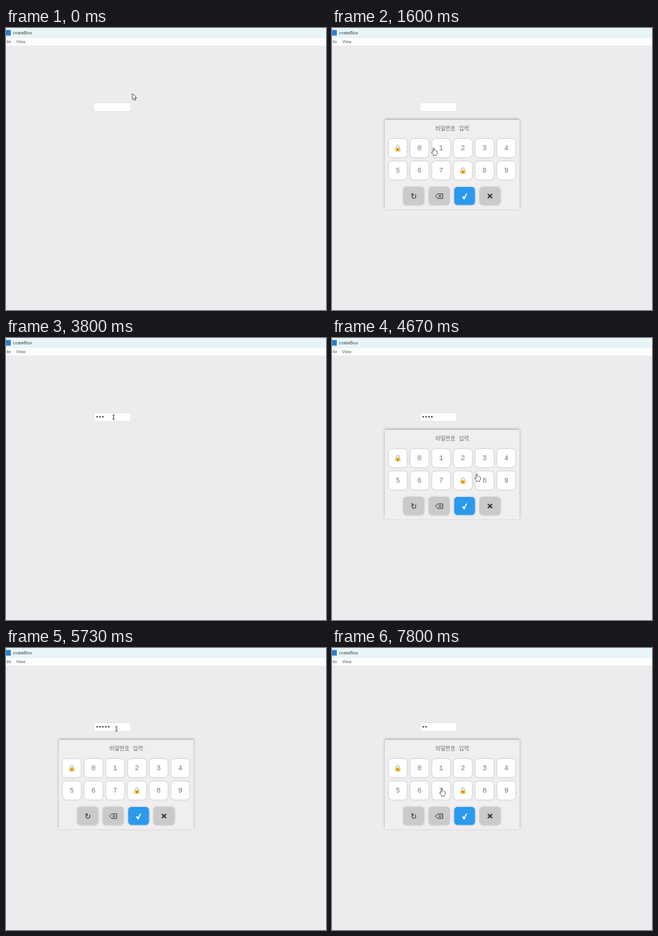
An HTML page that plays this animation: 400x353 px, repeating every 8000 ms.

```html
<!DOCTYPE html>
<html lang="ko">
<head>
<meta charset="utf-8">
<title>Keypad</title>
<style>
  html, body { margin: 0; width: 100%; height: 100%; overflow: hidden; background: #edebee; }
  svg { display: block; width: 400px; height: 353px; }
  .ui { font: 5.8px "Open Sans", "Noto Sans", sans-serif; fill: #333; }
  .menu { font-size: 5.4px; fill: #555b66; }
  .title { font: 6.8px "Noto Sans CJK KR", "Noto Sans CJK", "Noto Sans CJK JP", sans-serif; word-spacing: 2.6px; fill: #6c6c6c; }
  .digit { font: 8.8px "Liberation Mono", monospace; fill: #777; }
  .icon { font: 9.5px "DejaVu Sans", sans-serif; fill: #222; }
  .title, .digit, .icon { text-anchor: middle; }
  .panel { fill: #f0eef1; filter: drop-shadow(0 -.2px 1.4px rgba(0, 0, 0, .3)); }
  .key { filter: drop-shadow(0 .8px 1.1px rgba(0, 0, 0, .24)); }
  .line { fill: none; stroke: #222; }
  .pointer { fill: #fff; stroke: #444; stroke-width: .75; stroke-linejoin: round; }
</style>
</head>
<body>
<svg viewBox="0 0 400 353">
  <defs>
    <g id="lock" transform="scale(.88)">
      <path d="M-2 0V-1.8a2 2.2 0 0 1 4 0V0" fill="none" stroke="#a9a49b" stroke-width="1"/>
      <rect x="-3.6" y="-.6" width="7.2" height="5.4" rx=".9" fill="#f3c04a"/>
      <path d="M0 1.2V3.1" stroke="#6b5020" stroke-width="1.1" stroke-linecap="round"/>
    </g>
  </defs>

  <rect width="400" height="353" fill="#edebee"/>
  <rect width="400" height="13" fill="#e7f4f8"/>
  <rect y="12.5" width="400" height="9.5" fill="#fdfdfd"/>
  <rect x="-1" y="2.5" width="7" height="7" fill="#2c7fcb"/>
  <text class="ui" x="8.8" y="7.9">crateBox</text>
  <text class="ui menu" x="-2.2" y="19.2">File</text>
  <text class="ui menu" x="12.8" y="19.2">View</text>

  <rect x="110" y="93.5" width="46" height="10.8" fill="#fff" stroke="#e3e1e4" stroke-width=".8"/>
  <g id="dots" fill="#111"></g>

  <g id="pad">
    <rect class="panel" x="66" y="115" width="168.5" height="112"/>
    <text class="title" x="150.2" y="127.7">비밀번호 입력</text>
    <g id="keys"></g>
    <text class="icon" x="102.2" y="213.6">↻</text>
    <path class="line" stroke-width=".75" d="M129.3 210.5l2.8-2.8h6.3v5.6h-6.3zM133.4 209l3 3M136.4 209l-3 3"/>
    <path d="M162.4 211.2l1.6-.7 1.1 1.6q1.2-3.2 3-5l1 .4q-2.2 3.2-3.2 6.9h-1.5q-.8-2-2-3.2z" fill="#fff"/>
    <path class="line" stroke-width="1.4" d="M194.8 207.7l5.4 5.4M200.2 207.7l-5.4 5.4"/>
  </g>

  <g id="cursor">
    <path id="arrow" class="pointer" d="M0 0V7.6L1.8 6 3 8.7 4.3 8.1 3.1 5.5H5.4Z"/>
    <path id="beam" class="line" stroke-width=".75" d="M-1.5-2.8Q-.2-2.8 0-2.2Q.2-2.8 1.5-2.8M0-2.2V2.4M-1.5 3Q-.2 3 0 2.4Q.2 3 1.5 3"/>
    <path id="hand" class="pointer" transform="scale(.9)" d="M-.8.8Q-.8 0 0 0T.8.8V3.4Q1.6 2.9 2.3 3.7Q3.2 3.3 3.7 4.1Q5 3.9 5 5.2V7.2Q5 8.6 4.2 9.3V10.4H-.4V9.5L-2.5 6.6Q-3.1 5.5-2.2 5.2Q-1.6 5.1-.8 6Z"/>
  </g>
</svg>
<script>
const LOOP = 8000, FPS = 15, TRAVEL = 330, REST = 270;
const $ = id => document.getElementById(id);

// Clicks: [ms, x, y]; what each one does follows from where it lands
const clicks = [
  [470, 136, 98], [1670, 127, 150], [1930, 127, 150], [2470, 128, 174], [3470, 164, 206],
  [4070, 134.5, 99], [4400, 169, 146], [4870, 181, 170], [5200, 164, 207],
  [5670, 138, 101], [6730, 108, 206], [7470, 129, 151], [7730, 137, 176]
];
const home = [0, 158, 82];

const actions = {
  open: s => s.open = true,
  close: s => s.open = false,
  type: s => s.count++,
  erase: s => s.count--,
  clear: s => s.count = 0
};
const field = { x: 110, y: 93, w: 46, h: 12, action: "open" };
const buttons = [];

function addButton(x, y, w, h, fill, action) {
  buttons.push({ x, y, w, h, action });
  return `<rect class="key" x="${x}" y="${y}" width="${w}" height="${h}" rx="4.2" fill="${fill}"/>`;
}

let keys = "";
[..."*01234567*89"].forEach((label, i) => {
  const x = 71 + i % 6 * 27.1, y = i < 6 ? 139 : 167, cx = x + 11.3;
  keys += addButton(x, y, 22.6, 22.8, "#fff", "type");
  keys += label === "*"
    ? `<use href="#lock" x="${cx}" y="${y + 11.4}"/>`
    : `<text class="digit" x="${cx}" y="${y + 14.2}">${label}</text>`;
});
["clear", "erase", "close", "close"].forEach((action, i) => {
  keys += addButton(89.2 + i * 31.8, 199, 25.9, 22.4, i === 2 ? "#2b99ed" : "#cac9cb", action);
});
$("keys").innerHTML = keys;

for (let i = 0; i < 5; i++) $("dots").innerHTML += `<circle cx="${114 + i * 3.6}" cy="98.6" r=".95"/>`;
const dots = [...$("dots").children];

const show = (el, on) => el.setAttribute("visibility", on ? "visible" : "hidden");
const targetAt = (x, y) => [field, ...buttons].find(b => x >= b.x && x <= b.x + b.w && y >= b.y && y <= b.y + b.h);

function stateAt(t) {
  const state = { open: false, count: 0 };
  for (const [at, x, y] of clicks) if (at <= t) actions[targetAt(x, y).action](state);
  return state;
}

// Glide to the next click, then rest there until it is due
function pointerAt(t) {
  const next = clicks.findIndex(c => c[0] > t);
  if (next < 0) return clicks[clicks.length - 1].slice(1);
  const [t0, x0, y0] = clicks[next - 1] || home, [t1, x1, y1] = clicks[next];
  const arrive = Math.max(t1 - REST, (t0 + t1) / 2);
  const leave = Math.max(t0, arrive - TRAVEL);
  const k = Math.min(1, Math.max(0, (t - leave) / (arrive - leave)));
  const e = k * k * (3 - 2 * k);
  return [x0 + (x1 - x0) * e, y0 + (y1 - y0) * e];
}

function draw(now) {
  // the picture updates at a fixed rate
  const t = Math.floor((now % LOOP + 4) * FPS / 1000) * 1000 / FPS + 4;
  const { open, count } = stateAt(t);
  const [x, y] = pointerAt(t);
  const over = targetAt(x, y);
  const shape = over === field ? "beam" : over && open ? "hand" : "arrow";

  $("pad").style.display = open ? "" : "none";
  dots.forEach((d, i) => show(d, i < count));
  for (const id of ["arrow", "beam", "hand"]) show($(id), id === shape);
  $("cursor").setAttribute("transform", `translate(${x.toFixed(2)} ${y.toFixed(2)})`);
}

const start = performance.now();
function tick() {
  draw(performance.now() - start);
  requestAnimationFrame(tick);
}
tick();
</script>
</body>
</html>
```
